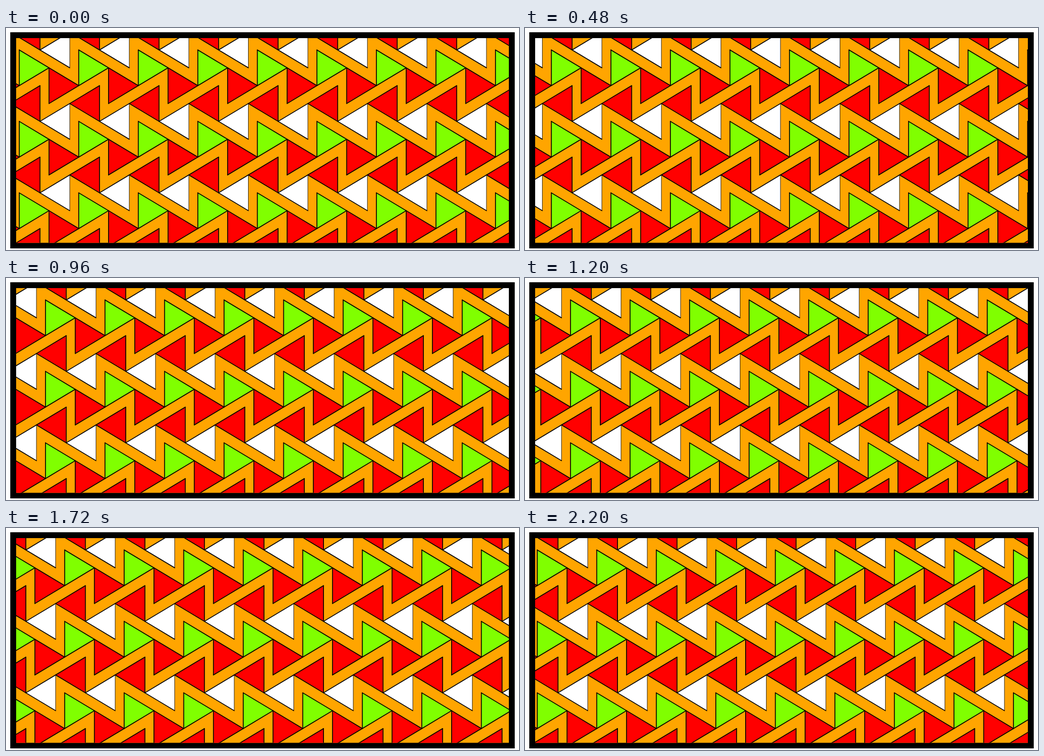
Recreate the animation shown at these times as an HTML page with a canvas. Size 960 by 417 pixels, loop 2.24 s.

```html
<!DOCTYPE html>
<html lang="en">
<head>
<meta charset="utf-8">
<title>Sliding triangle tiling</title>
<style>
  html, body { margin: 0; width: 100%; height: 100%; overflow: hidden; background: #fff; }
  canvas { display: block; }
</style>
</head>
<body>
<canvas id="stage" width="960" height="417"></canvas>
<script>
const ctx = document.getElementById('stage').getContext('2d');

const LOOP = 2240, TICK = 40;
const PITCH_X = 111.4, PITCH_Y = 134.2;
const W = PITCH_X / 2, H = PITCH_Y / 4;   // triangle width and half its height
const START_X = 24.8, START_Y = 41.2;
const UNITS = 59;                         // equal shifts per horizontal period
const DOUBLE_TICKS = [4, 21, 49];         // ticks that advance two units

// Each triangle: vertical edge position, direction of the apex, fill
const TILE = [
  { x: 0, y: 0, dir: 1, fill: '#80ff00' },
  { x: W, y: H, dir: 1, fill: '#f00' },
  { x: 94.5 + W, y: 2 * H, dir: -1, fill: '#f00' },
  { x: 94.5, y: 3 * H, dir: -1, fill: '#fff', edge: 0.8 }
];

function triangle(x, y, { dir, fill, edge = 1.6 }) {
  const bottom = y + 2 * H;
  ctx.fillStyle = fill;
  ctx.beginPath();
  ctx.moveTo(x, y);
  ctx.lineTo(x + dir * W, y + H);
  ctx.lineTo(x, bottom);
  ctx.closePath();
  ctx.fill();

  ctx.lineWidth = 1.6;
  ctx.beginPath();
  ctx.moveTo(x, y);
  ctx.lineTo(x + dir * W, y + H);
  ctx.lineTo(x, bottom);
  ctx.stroke();

  ctx.lineWidth = edge;
  ctx.beginPath();
  ctx.moveTo(x, y);
  ctx.lineTo(x, bottom);
  ctx.stroke();
}

function draw(time) {
  const tick = Math.floor((time % LOOP) / TICK);
  const units = tick + DOUBLE_TICKS.filter(t => t <= tick).length;
  const shift = START_X + units * PITCH_X / UNITS;

  ctx.fillStyle = '#fff';
  ctx.fillRect(0, 0, 960, 417);
  ctx.fillStyle = '#000';
  ctx.fillRect(8, 8, 944, 406);

  ctx.save();
  ctx.beginPath();
  ctx.rect(19, 19, 922, 384.5);
  ctx.clip();
  ctx.fillStyle = '#ffa500';
  ctx.fillRect(19, 19, 922, 385);
  ctx.strokeStyle = '#000';
  ctx.lineJoin = ctx.lineCap = 'round';
  for (let row = -1; row < 3; row++) {
    for (let col = -3; col < 9; col++) {
      for (const t of TILE) {
        triangle(shift + col * PITCH_X + t.x, START_Y + row * PITCH_Y + t.y, t);
      }
    }
  }
  ctx.restore();
}

const start = performance.now();
function frame() {
  draw(performance.now() - start);
  requestAnimationFrame(frame);
}
frame();
</script>
</body>
</html>
```
